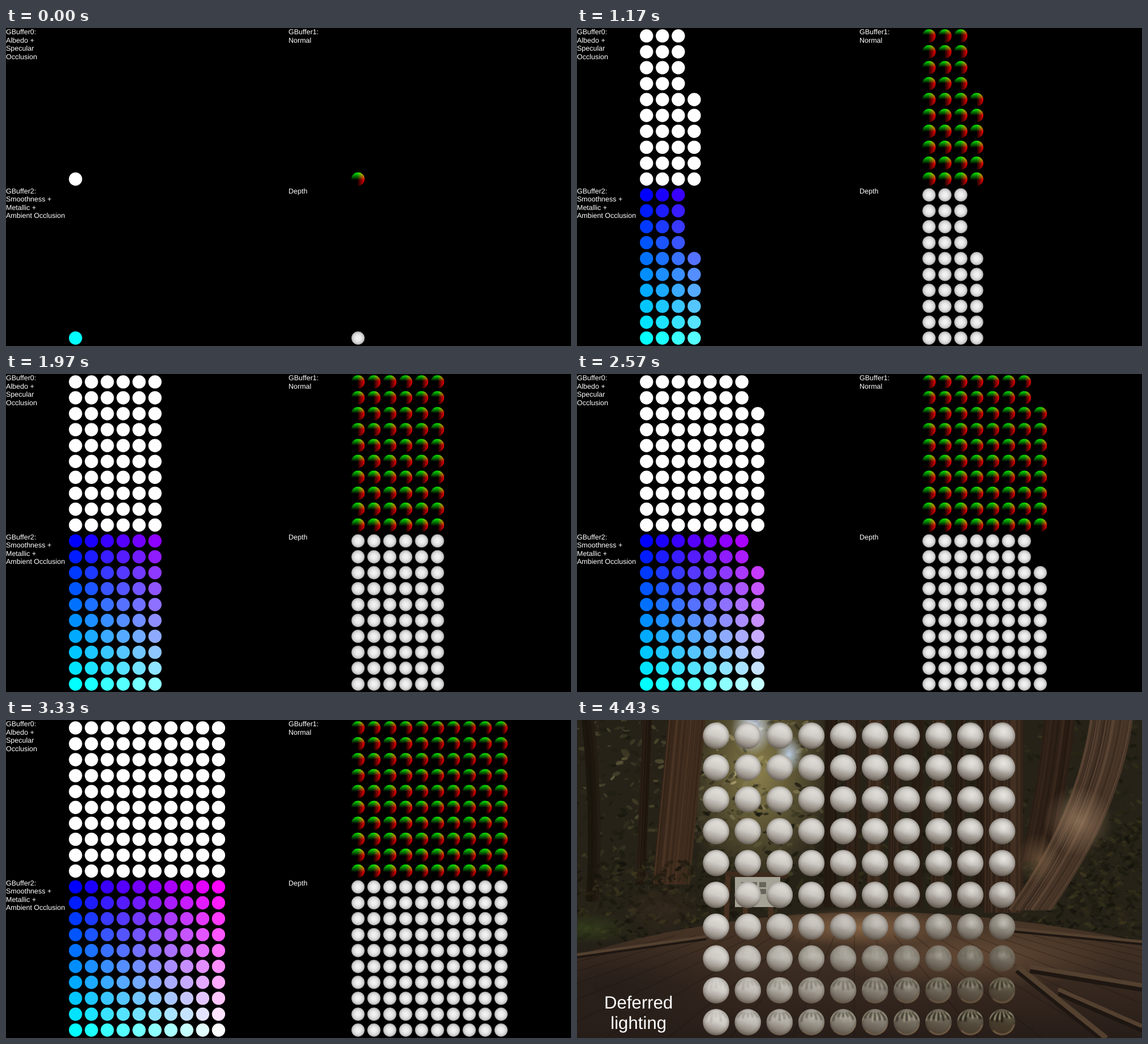
An HTML page with a canvas that plays this animation: 998 by 561 pixels, repeating every 6930 ms.

```html
<!DOCTYPE html>
<html lang="en">
<head>
<meta charset="utf-8">
<title>Deferred shading buffers</title>
<style>
html, body { margin: 0; width: 100%; height: 100%; overflow: hidden; background: #000; }
.view, .view > * { position: absolute; left: 0; top: 0; width: 998px; height: 561px; }
text { fill: #fff; font: 12.5px "Liberation Sans", Arial, sans-serif; text-rendering: geometricPrecision; }
#final { visibility: hidden; }
#final text { font-size: 31.2px; text-anchor: middle; }
</style>
</head>
<body>
<div class="view" id="buffers">
<canvas id="grid" width="998" height="561"></canvas>
<svg viewBox="0 0 998 561"></svg>
</div>
<div class="view" id="final">
<canvas id="scene" width="998" height="561"></canvas>
<svg viewBox="0 0 998 561"></svg>
</div>
<script>
const W = 998, H = 561, LOOP = 6930, CUT = 4030;
const STEP = 28.07, RADIUS = 11.7, X0 = 122.8, Y0 = 13.9;
const $ = id => document.getElementById(id);
const grid = $('grid').getContext('2d');
const scene = $('scene').getContext('2d');

let seed = 11;
const rnd = (a = 0, b = 1) => a + (b - a) * ((seed = seed * 16807 % 2147483647) / 2147483647);
const mix = (a, b, k) => a.map((v, i) => v + (b[i] - v) * k);
const rgb = (c, a = 1) => `rgba(${c.map(Math.round)},${a})`;
const bell = (x, mid, width) => Math.exp(-(((x - mid) / width) ** 2));
const ramp = (a, b, x) => {
  const k = Math.min(1, Math.max(0, (x - a) / (b - a)));
  return k * k * (3 - 2 * k);
};

function label(view, x, y, leading, text) {
  text.split('\n').forEach((words, i) => {
    const el = document.createElementNS('http://www.w3.org/2000/svg', 'text');
    el.setAttribute('x', x);
    el.setAttribute('y', y + i * leading);
    el.textContent = words;
    $(view).lastElementChild.append(el);
  });
}

function disc(g, x, y, r, fill) {
  g.fillStyle = fill;
  g.beginPath();
  g.arc(x, y, r, 0, 7);
  g.fill();
}

function shade(fill, ...colors) {
  colors.forEach((c, i) => fill.addColorStop(i / (colors.length - 1), c));
  return fill;
}

// ---- Buffer panels ----
function depthFill(x, y) {
  const tones = Array.from({ length: 11 }, (_, i) => {
    const v = 148 + 94 * Math.sqrt(1 - i * i / 100);
    return rgb([v, v, v]);
  });
  return shade(grid.createRadialGradient(x, y, 0, x, y, RADIUS), ...tones);
}

// Normals lean toward the eye, which sits over the panel's centre.
function drawNormal(x, y, leanX, leanY) {
  const r = RADIUS;
  grid.globalCompositeOperation = 'lighter';
  disc(grid, x, y, r, shade(grid.createLinearGradient(x - leanX * r, y, x + r, y), '#000', '#eb0000'));
  disc(grid, x, y, r, shade(grid.createLinearGradient(x, y + leanY * r, x, y - r), '#000', '#00eb00'));
  grid.globalCompositeOperation = 'source-over';
}

function drawGrid(count) {
  grid.fillStyle = '#000';
  grid.fillRect(0, 0, W, H);
  for (let i = 0; i < count; i++) {
    const col = Math.floor(i / 10), row = 9 - i % 10;
    const x = X0 + col * STEP, y = Y0 + row * STEP;
    const x2 = x + W / 2, y2 = y + H / 2;
    disc(grid, x, y, RADIUS, '#fff');
    disc(grid, x, y2, RADIUS, rgb([col / 9 * 255, row / 9 * 255, 255]));
    disc(grid, x2, y2, RADIUS, depthFill(x2, y2));
    drawNormal(x2, y, (4.5 - col) * 0.03, (row - 4.5) * 0.03);
  }
}

// ---- Woodland backdrop ----
function glow(x, y, rx, ry, color, alpha) {
  scene.save();
  scene.translate(x, y);
  scene.scale(rx, ry);
  disc(scene, 0, 0, 1, shade(scene.createRadialGradient(0, 0, 0, 0, 0, 1), rgb(color, alpha), rgb(color, 0)));
  scene.restore();
}

function line(color, width, x1, y1, x2, y2) {
  scene.strokeStyle = color;
  scene.lineWidth = width;
  scene.beginPath();
  scene.moveTo(x1, y1);
  scene.lineTo(x2, y2);
  scene.stroke();
}

// A trunk is a sheaf of bark fibres, each running from the top to the foot.
function trunk(top, foot, width, height, color, bow = 0) {
  for (let i = 0; i <= width; i += 2) {
    const tone = mix(color, [10, 7, 4], rnd(0, 0.45));
    scene.strokeStyle = rgb(tone);
    scene.lineWidth = 4;
    scene.beginPath();
    scene.moveTo(top + i, 0);
    scene.quadraticCurveTo((top + foot) / 2 + bow + i, height / 2, foot + i, height);
    scene.stroke();
  }
}

function dab(x, y, size, color) {
  scene.fillStyle = rgb(color, rnd(0.3, 0.8));
  scene.beginPath();
  scene.ellipse(x, y, size, size * 0.45, rnd(-1, 1), 0, 7);
  scene.fill();
}

function drawFoliage() {
  for (let i = 0; i < 1800; i++) {
    const x = rnd(0, W), y = rnd(0, 330);
    const sun = (bell(x, 320, 110) + 0.4 * bell(x, 40, 90)) * bell(y, 60, 150);
    dab(x, y, rnd(2, 9), mix([20, 20, 11], mix([62, 58, 32], [225, 212, 150], sun), rnd() ** 1.5));
  }
}

function drawUndergrowth() {
  for (let i = 0; i < 1300; i++) {
    const left = i % 2;
    const x = left ? rnd(0, 370) : rnd(790, W);
    const y = left ? rnd(250, 395) : rnd(170 + (W - x) * 0.4, 390);
    dab(x, y, rnd(2, 8), mix([19, 18, 11], [67, 60, 33], rnd() ** 2));
  }
}

function drawDeck() {
  scene.fillStyle = shade(scene.createLinearGradient(0, 330, 0, H), '#4a3727', '#3a2b21', '#271d18');
  scene.beginPath();
  scene.moveTo(0, 415);
  scene.quadraticCurveTo(460, 275, W, 392);
  scene.lineTo(W, H);
  scene.lineTo(0, H);
  scene.fill();
  glow(60, 470, 240, 90, [31, 25, 22], 0.7);
  glow(500, 366, 170, 35, [165, 122, 84], 0.7);
  glow(700, 415, 260, 60, [118, 87, 62], 0.65);
  for (let i = -9; i < 16; i++) line('rgba(20,14,10,.35)', 1.2, 490 + i * 35, 380, 490 + i * 110, H);
  for (let i = 0; i < 2; i++) {
    const color = i ? '#53402f' : '#1e1611', drop = 4 - i * 4;
    line(color, 5, 0, 414 + drop, 228, 382 + drop);
    line(color, 5, 765, 368 + drop, W, 391 + drop);
    line(color, 9, 777, 434 + drop * 2, 935, H + drop * 2);
    line(color, 7, 800, 435 + drop * 2, W, 468 + drop * 2);
    line(color, 7, 850, 475 + drop * 2, W, 540 + drop * 2);
  }
}

function drawBoard() {
  for (const x of [267, 300, 345]) line('#46301f', 9, x, 268, x - 4, 370);
  line('#3e2a1c', 9, 264, 271, 371, 275);
  scene.fillStyle = '#a5a296';
  scene.fillRect(279, 277, 80, 53);
  scene.fillStyle = '#66655c';
  for (let i = 0; i < 6; i++) scene.fillRect(290 + i % 3 * 16, 286 + (i > 2) * 12, 12, 9);
}

function drawForest() {
  scene.fillStyle = '#262218';
  scene.fillRect(0, 0, W, H);
  glow(320, 90, 140, 210, [150, 138, 82], 0.9);
  drawFoliage();
  glow(310, 15, 38, 48, [215, 228, 250], 1);
  glow(375, 60, 24, 34, [195, 214, 240], 0.9);
  trunk(118, 106, 13, 290, [44, 31, 21]);
  trunk(10, 18, 18, 320, [36, 29, 18], 14);
  trunk(163, 135, 62, 290, [76, 53, 36]);
  for (let x = 440; x < 720; x += 38) trunk(x, x - 3, rnd(16, 26), 330, mix([42, 30, 20], [84, 60, 42], rnd()));
  trunk(722, 722, 64, 340, [70, 50, 36]);
  trunk(828, 785, 50, 250, [56, 39, 28], 8);
  drawUndergrowth();
  trunk(908, 764, 72, 335, [92, 69, 52], 48);
  glow(885, 178, 62, 62, [186, 152, 118], 0.55);
  glow(815, 245, 40, 45, [155, 122, 86], 0.45);
  glow(150, 332, 70, 48, [58, 42, 30], 0.6);
  glow(20, 367, 75, 28, [56, 70, 30], 0.7);
  drawDeck();
  drawBoard();
}

// ---- Lit spheres ----
function reflect(x, y, r, metal, gloss) {
  const amount = ramp(0.6, 1, gloss) * (0.12 + 0.75 * metal);
  if (!amount) return;
  scene.save();
  scene.beginPath();
  scene.arc(x, y, r, 0, 7);
  scene.clip();
  scene.filter = `blur(${0.8 + (1 - gloss) * 9}px)`;
  scene.globalAlpha = amount;
  for (let i = -5; i <= 5; i++) {
    const bend = i * r / 6;
    scene.strokeStyle = i % 2 ? '#cfc9a6' : '#1c1810';
    scene.lineWidth = i % 2 ? 2 : 4;
    scene.beginPath();
    scene.moveTo(x + bend * 0.6, y - r * 0.75);
    scene.quadraticCurveTo(x + bend * 1.1, y - r * 0.5, x + bend * 1.15, y - r * rnd(0, 0.4));
    scene.stroke();
  }
  scene.strokeStyle = '#a17c57';
  scene.lineWidth = 2;
  scene.beginPath();
  scene.arc(x, y, r * 0.94, 0.2, 2.4);
  scene.stroke();
  scene.restore();
}

function drawSphere(x, y, r, metal, gloss) {
  const mirror = metal * ramp(0.45, 1, gloss);
  const tone = (matte, rough, shiny) => rgb(mix(mix(matte, rough, metal), shiny, mirror));
  disc(scene, x, y, r, shade(
    scene.createLinearGradient(x + r * 0.3, y - r, x - r * 0.3, y + r),
    tone([236, 234, 230], [208, 205, 200], [112, 104, 82]),
    tone([207, 203, 197], [190, 186, 180], [72, 63, 47]),
    tone([124, 116, 106], [112, 104, 95], [64, 51, 37])));
  const spread = r * (0.85 - 0.4 * gloss);
  glow(x + r * 0.1, y - r * 0.3, spread, spread, [255, 254, 250], 0.6 * metal * (1 - mirror));
  const rim = scene.createRadialGradient(x, y, r * 0.6, x, y, r);
  disc(scene, x, y, r, shade(rim, 'rgba(50,42,34,0)', 'rgba(50,42,34,.08)', 'rgba(50,42,34,.35)'));
  reflect(x, y, r, metal, gloss);
}

function drawScene() {
  drawForest();
  for (let i = 0; i < 100; i++) {
    const col = i % 10, row = Math.floor(i / 10);
    drawSphere(2 * (X0 + col * STEP), 2 * (Y0 + row * STEP), 2 * RADIUS - 0.2, col / 9, row / 9);
  }
}

// ---- Playback ----
const start = performance.now();
let shown = 0;

function play() {
  const t = (performance.now() - start) % LOOP;
  const count = Math.min(100, 1 + Math.floor(t * 0.03 + 0.11));
  if (count !== shown) drawGrid(shown = count);
  const lit = t >= CUT;
  $('final').style.visibility = lit ? 'visible' : 'hidden';
  $('buffers').style.visibility = lit ? 'hidden' : 'visible';
  requestAnimationFrame(play);
}

label('buffers', 0, 11.3, 14.4, 'GBuffer0:\nAlbedo +\nSpecular\nOcclusion');
label('buffers', W / 2, 11.3, 14.4, 'GBuffer1:\nNormal');
label('buffers', 0, 291.8, 14.4, 'GBuffer2:\nSmoothness +\nMetallic +\nAmbient Occlusion');
label('buffers', W / 2, 291.8, 14.4, 'Depth');
label('final', 108.7, 508.5, 36, 'Deferred\nlighting');
drawScene();
play();
</script>
</body>
</html>
```
